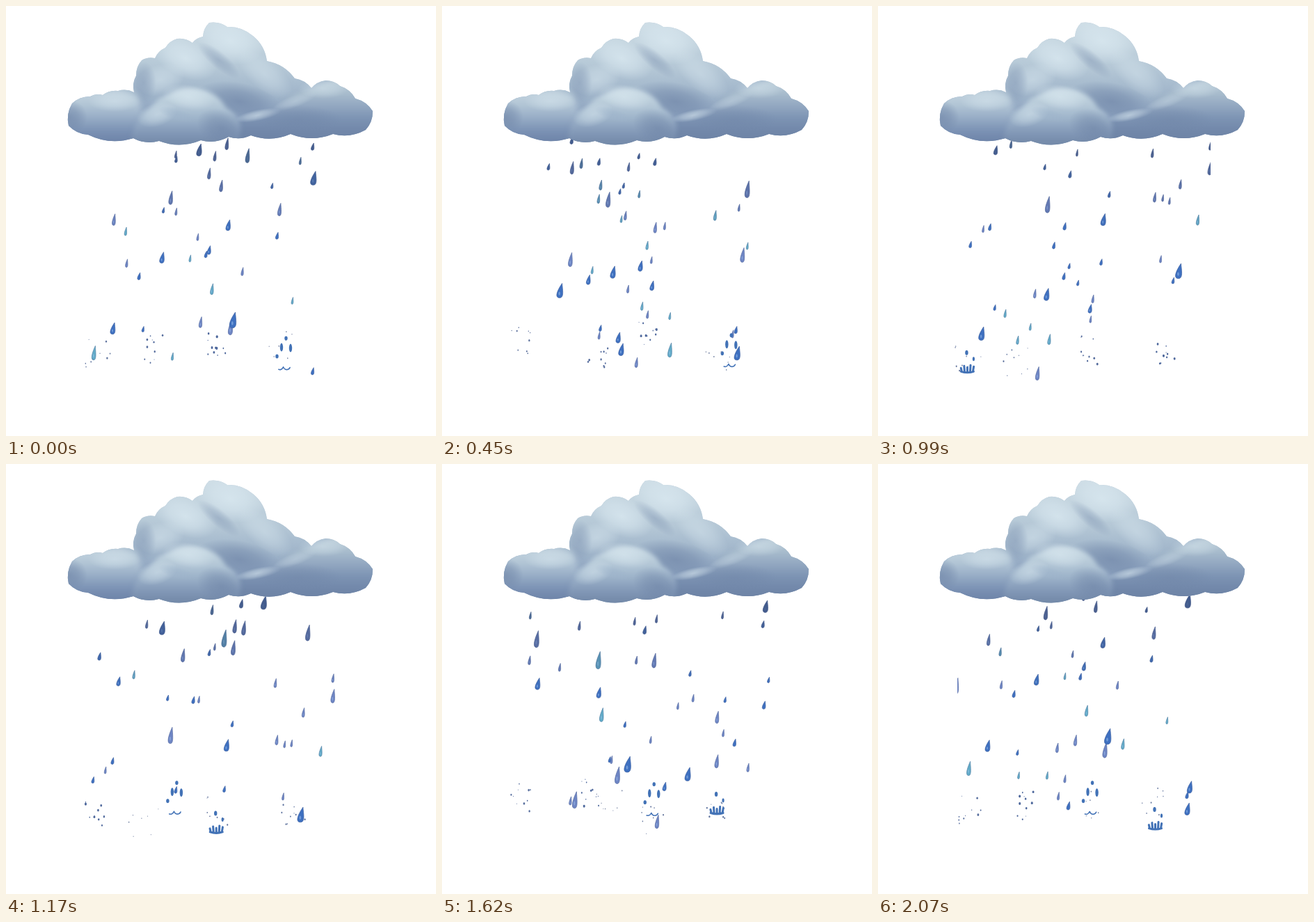
Recreate the animation shown at these times as an HTML page with a canvas. Size 618 px wide and 618 px high, loop 2.16 s.

```html
<!DOCTYPE html>
<html lang="en">
<head>
<meta charset="utf-8">
<title>Rain cloud</title>
<style>
html, body { margin: 0; width: 100%; height: 100%; overflow: hidden; background: #fff; }
canvas { display: block; width: 618px; height: 618px; }
</style>
</head>
<body>
<canvas id="stage" width="618" height="618"></canvas>
<script>
const SIZE = 618, STEP = 90, STEPS = 24, TAU = Math.PI * 2;
const ctx = document.getElementById('stage').getContext('2d');

function seeded(seed) {
  return () => {
    seed = (seed + 0x6d2b79f5) | 0;
    let t = Math.imul(seed ^ (seed >>> 15), 1 | seed);
    t = (t + Math.imul(t ^ (t >>> 7), 61 | t)) ^ t;
    return ((t ^ (t >>> 14)) >>> 0) / 4294967296;
  };
}

const wrap = n => ((n % STEPS) + STEPS) % STEPS;
const clamp = (v, lo, hi) => Math.min(hi, Math.max(lo, v));
const mix = (a, b, t) => `rgb(${a.map((v, i) => Math.round(v + (b[i] - v) * t))})`;

// ---- Cloud ----
// Closed clockwise outline: every pair of notches is joined by an outward bulge
function scallops(notches, bulge = 0.2) {
  const path = new Path2D();
  path.moveTo(...notches[0]);
  notches.forEach(([x, y], i) => {
    const [u, v] = notches[(i + 1) % notches.length];
    path.quadraticCurveTo((x + u) / 2 + (v - y) * bulge, (y + v) / 2 - (u - x) * bulge, u, v);
  });
  return path;
}

const outline = scallops([
  [90, 172], [95, 140], [121, 130], [139, 128], [161, 122], [184, 124], [187, 100], [195, 78],
  [214, 75], [229, 60], [246, 47], [268, 53], [283, 44], [292, 24], [318, 30], [355, 43],
  [375, 79], [415, 104], [439, 118], [459, 107], [480, 115], [502, 133], [527, 151], [517, 178],
  [470, 184], [409, 184], [352, 186], [320, 188], [280, 193], [220, 194], [183, 190], [118, 185]
]);
const leftArm = scallops([[80, 200], [90, 135], [140, 120], [188, 128], [192, 205]]);
const rightArm = scallops([[332, 168], [350, 156], [386, 151], [398, 134], [438, 119], [490, 105], [545, 150], [530, 205], [335, 205]], 0.1);
const front = scallops([[181, 200], [190, 164], [207, 147], [234, 127], [285, 121], [316, 146], [337, 172], [325, 207]]);

const LIGHT = '217,232,240', MID = '158,180,203', SHADE = '112,134,168';

function makeCloud() {
  const sheet = document.createElement('canvas');
  sheet.width = sheet.height = SIZE;
  const g = sheet.getContext('2d');

  const shape = (path, top, colors, blur) => {
    const fill = g.createLinearGradient(0, top, 0, 196);
    colors.forEach((c, i) => fill.addColorStop(i / (colors.length - 1), c));
    g.filter = `blur(${blur}px)`;
    g.fillStyle = fill;
    g.fill(path);
    g.filter = 'none';
  };
  const puff = (rgb, alpha, x, y, rx, ry, turn = 0) => {
    g.save();
    g.translate(x, y);
    g.rotate(turn);
    g.scale(rx, ry);
    const fill = g.createRadialGradient(0, 0, 0, 0, 0, 1);
    [1, 0.65, 0].forEach((a, i) => fill.addColorStop(i / 2, `rgba(${rgb},${alpha * a})`));
    g.fillStyle = fill;
    g.fillRect(-1, -1, 2, 2);
    g.restore();
  };

  g.clip(outline);
  shape(outline, 22, ['#cddce5', '#c2d3de', '#b3c6d5', '#a0b5ca', '#8aa0be', '#768cb0'], 0);
  g.fillStyle = '#b9cad7';
  g.globalCompositeOperation = 'destination-over';
  g.fillRect(0, 0, SIZE, SIZE);
  g.globalCompositeOperation = 'source-over';
  puff(LIGHT, 0.8, 322, 50, 50, 32, 0.3);
  puff(LIGHT, 0.8, 258, 75, 48, 28, 0.4);
  puff(LIGHT, 0.5, 222, 106, 36, 22, -0.3);
  puff(LIGHT, 0.45, 372, 98, 48, 22, 0.7);
  puff(SHADE, 0.35, 306, 78, 38, 12, 0.7);
  puff(SHADE, 0.4, 198, 110, 18, 30);
  puff(SHADE, 0.7, 335, 137, 62, 27, 0.2);

  shape(leftArm, 121, ['#c3d4df', '#b5c8d7', '#9bb0c8', '#7d94b6', '#6d83a8'], 4);
  puff(SHADE, 0.65, 91, 160, 26, 25);
  puff(LIGHT, 0.5, 156, 137, 38, 15);

  shape(rightArm, 108, ['#bccdd9', '#a8bccd', '#93a8c1', '#7d94b4', '#7288aa', '#6d82a4'], 2);
  puff(LIGHT, 0.6, 362, 157, 34, 8, -0.2);
  puff(LIGHT, 0.45, 456, 119, 36, 14);
  puff(LIGHT, 0.35, 415, 137, 34, 9, -0.35);
  puff(SHADE, 0.5, 420, 163, 62, 20);

  shape(front, 116, ['#cfdfe8', '#c0d2de', '#afc3d4', '#9bb1c8', '#859bb9', '#758baa'], 3);
  puff(LIGHT, 0.6, 262, 131, 38, 18, 0.2);
  puff(LIGHT, 0.5, 217, 156, 30, 17, -0.3);
  puff(MID, 0.55, 246, 156, 28, 9, 0.3);
  puff(SHADE, 0.65, 310, 176, 38, 26, 0.5);
  return sheet;
}

// ---- Rain ----
const BLUE = [62, 112, 192], LILAC = [110, 133, 196], CYAN = [98, 172, 200], DUSK = [68, 88, 132];

function makeDrops(count) {
  const rnd = seeded(41);
  return Array.from({ length: count }, (_, i) => {
    const kind = rnd(), slim = kind > 0.42;
    return {
      born: i % STEPS,
      x: rnd() < 0.3 ? 225 + rnd() * 120 : 116 + rnd() * 364,
      y: 188 + rnd() * 50,
      h: 8 + 15 * rnd() ** 2.2 + (slim ? 2 : 0),
      speed: 48 + rnd() * 16,
      end: 425 + rnd() * 115,
      tint: !slim ? BLUE : kind < 0.85 ? LILAC : CYAN,
      slim
    };
  });
}

function oval(x, y, rx, ry) {
  ctx.beginPath();
  ctx.ellipse(x, y, rx, ry, 0, 0, TAU);
  ctx.fill();
}

function drawDrop({ born, x, y, h, speed, end, tint, slim }, step) {
  const fall = wrap(step - born) * speed;
  y += fall;
  x -= fall * 0.07;
  if (y > end) return;
  const w = h * (slim ? 0.15 : 0.22), top = y - h / 2, low = y + h / 2;
  const lit = clamp((y - 190) / 130, 0.15, 1);
  ctx.beginPath();
  ctx.moveTo(x + w * 0.75, top);
  ctx.bezierCurveTo(x + w * 0.85, y - h * 0.1, x + w * 1.5, low, x, low);
  ctx.bezierCurveTo(x - w * 1.7, low, x - w * 0.8, y, x + w * 0.75, top);
  ctx.fillStyle = mix(DUSK, tint, lit);
  ctx.fill();
  ctx.strokeStyle = mix(DUSK, tint, lit * 0.5);
  ctx.lineWidth = 0.7;
  ctx.stroke();
  if (h > 12) {
    ctx.fillStyle = `rgba(160,196,240,${0.5 * lit})`;
    oval(x - w * 0.1, y + h * 0.2, w * 0.28, h * 0.13);
  }
}

// ---- Splashes: four lanes, each hit five times per loop ----
const LANES = 4, HITS = 5, LIFE = 7;

function makeSplashes() {
  const rnd = seeded(12);
  return Array.from({ length: LANES * HITS }, (_, i) => {
    const lane = i % LANES, hit = Math.floor(i / LANES);
    return {
      x: 118 + lane * 92 + (rnd() - 0.3) * 45,
      y: 495 + rnd() * 38,
      born: Math.round(1 + lane + hit * STEPS / HITS) % STEPS,
      seed: i * 97 + 5
    };
  });
}

function crown() {
  ctx.lineWidth = 3;
  ctx.beginPath();
  ctx.moveTo(-9, 0);
  ctx.quadraticCurveTo(0, 3, 9, 0);
  for (let i = 0; i < 5; i++) {
    const x = -8 + i * 4;
    ctx.moveTo(x, 0);
    ctx.lineTo(x * 1.15, -5 - (i * 3) % 5);
  }
  ctx.stroke();
  oval(-1, -27, 2.2, 3.5);
  oval(9, -18, 1.6, 3);
}

function burst() {
  for (let i = 0; i < 4; i++) oval(-9 + i * 6.5, -20 - (i * 13) % 27, 2.2, 3 + i % 2 * 3);
  ctx.lineWidth = 1.6;
  for (const side of [-1, 1]) {
    ctx.beginPath();
    ctx.arc(side * 5, -6, 5, 0.4, 2.4 + side * 0.5);
    ctx.stroke();
  }
}

function spray(age, rnd) {
  ctx.fillStyle = mix([78, 104, 156], [135, 140, 160], (age - 2) / LIFE);
  for (let i = 0; i < 13 - age; i++) {
    const x = (rnd() - 0.5) * (20 + age * 4), y = -rnd() * 42 + (age - 3) * 2;
    const r = 0.45 + rnd() * (1.6 - age * 0.2);
    oval(x, y, r, r * 1.3);
  }
}

function drawSplash({ x, y, born, seed }, step) {
  const age = wrap(step - born);
  if (age >= LIFE) return;
  ctx.save();
  ctx.translate(x, y);
  ctx.lineCap = 'round';
  ctx.fillStyle = ctx.strokeStyle = '#4272b6';
  if (age === 0) crown();
  else if (age === 1) burst();
  else spray(age, seeded(seed));
  ctx.restore();
}

// ---- Playback ----
const cloud = makeCloud(), drops = makeDrops(176), splashes = makeSplashes();

function render(step) {
  ctx.fillStyle = '#fff';
  ctx.fillRect(0, 0, SIZE, SIZE);
  ctx.save();
  ctx.beginPath();
  ctx.rect(114, 150, 364, 391);
  ctx.clip();
  for (const d of drops) drawDrop(d, step);
  ctx.restore();
  for (const s of splashes) drawSplash(s, step);
  ctx.drawImage(cloud, 0, 0);
}

const start = performance.now();
let shown = -1;
function tick() {
  const step = Math.floor((performance.now() - start) / STEP) % STEPS;
  if (step !== shown) render(shown = step);
  requestAnimationFrame(tick);
}
tick();
</script>
</body>
</html>
```
